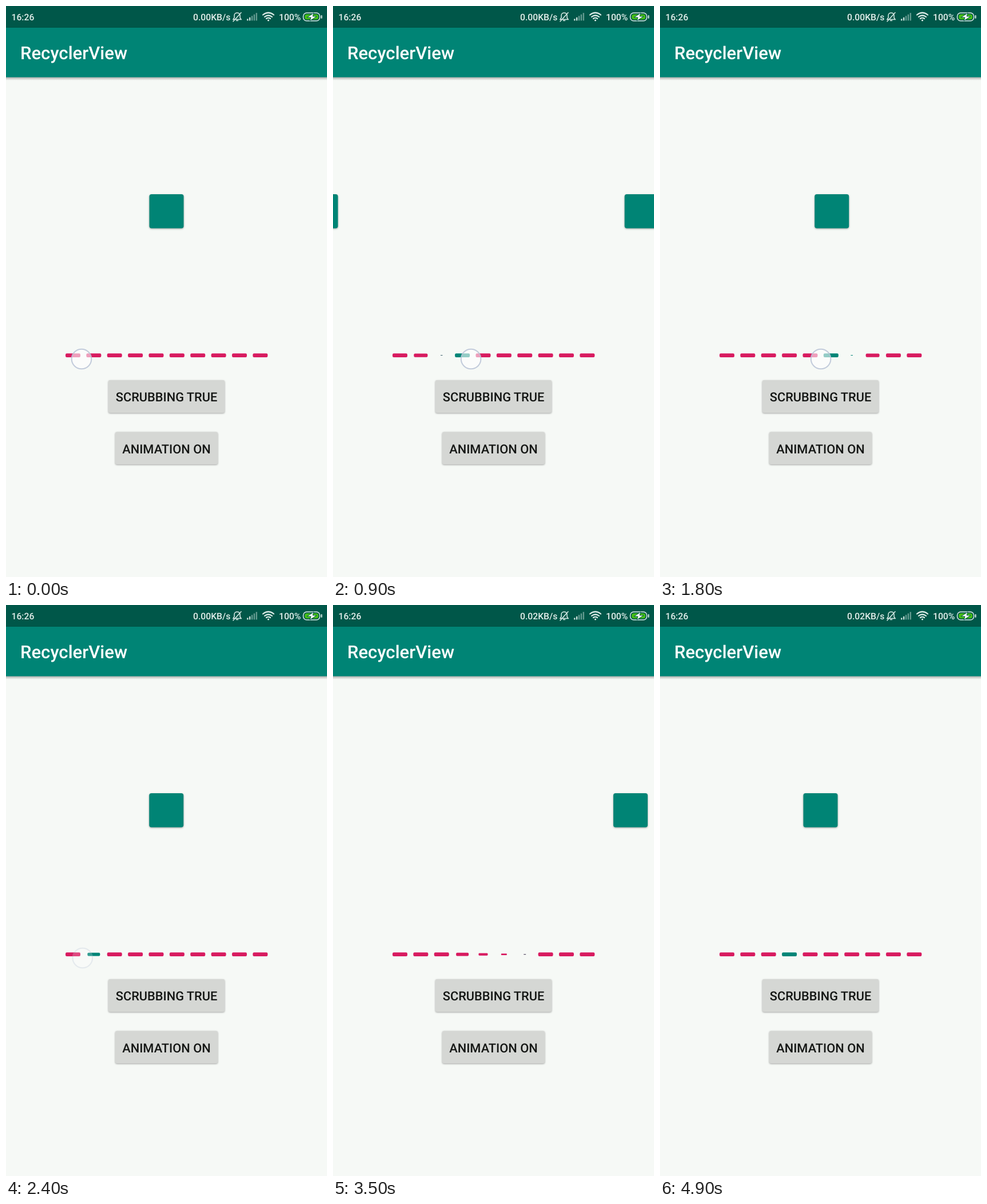
Write an HTML page that moves like this. It is 561x998 px and loops after 5000 ms.

```html
<!DOCTYPE html>
<html lang="en">
<head>
<meta charset="utf-8">
<title>RecyclerView</title>
<style>
  html, body { margin: 0; width: 100%; height: 100%; overflow: hidden; background: #f6f9f6; }
  svg { display: block; width: 561px; height: 998px; font-family: Roboto, sans-serif; font-weight: 500; text-rendering: geometricPrecision; }
  .raised { filter: drop-shadow(0 1.5px 1.5px rgba(0, 0, 0, .35)); }
  .status { fill: #e3eeeb; font-size: 15.7px; }
  .label { fill: #141614; font-size: 21.8px; text-anchor: middle; }
</style>
</head>
<body>
<svg viewBox="0 0 561 998">
  <defs>
    <linearGradient id="shade" x2="0" y2="1">
      <stop stop-color="#000" stop-opacity=".32"/>
      <stop offset="1" stop-color="#000" stop-opacity="0"/>
    </linearGradient>
  </defs>
  <rect width="561" height="998" fill="#f6f9f6"/>

  <rect y="124" width="561" height="6" fill="url(#shade)"/>
  <rect width="561" height="124.5" fill="#008475"/>
  <rect width="561" height="38" fill="#005749"/>
  <text x="25" y="93" font-size="31.1" fill="#fff">RecyclerView</text>

  <g class="status">
    <text x="9.5" y="24.7">16:26</text>
    <text id="speed" x="327" y="24.5">0.00KB/s</text>
    <text x="477" y="24.5">100%</text>
  </g>
  <g fill="none" stroke="#dcebe7" stroke-width="1.5" stroke-linecap="round">
    <path d="M397 23.5h14l-2-3v-4c0-6-10-6-10 0v4zM402.5 25.5h3M411 11.5L397 27"/>
    <path d="M449 15.5q9.5-7.5 19 0M452 19q6.5-5 13 0M455 22q3.5-2.5 7 0" stroke-width="2.2"/>
    <circle cx="458.5" cy="25" r=".8"/>
    <rect x="519.5" y="12" width="29" height="14" rx="6"/>
    <path d="M551.5 17v4" stroke-width="2"/>
  </g>
  <g id="signal" fill="#dcebe7"></g>
  <rect x="522" y="14.5" width="24" height="9" rx="4" fill="#45bd16"/>
  <path d="M538 12l-12 8h7l-2 6 12-8h-7z" fill="#fff" stroke="#005749"/>

  <g id="pages" class="raised" fill="#008475"></g>
  <g id="dashes"></g>

  <g class="raised" fill="#d5d7d4">
    <rect x="179" y="654" width="203" height="57" rx="3"/>
    <rect x="191" y="744.5" width="179" height="56.5" rx="3"/>
  </g>
  <text class="label" x="280.5" y="690.5">SCRUBBING TRUE</text>
  <text class="label" x="280.5" y="781.5">ANIMATION ON</text>

  <circle id="finger" r="17.3" fill="#fff" fill-opacity=".58" stroke="#b9c4d6" stroke-opacity=".85" stroke-width="2"/>
</svg>
<script>
const LOOP = 5000, STEP = 100, COUNT = 10, PAGE = 561, PITCH = 36.37;
const SLACK = 0.95;       // how far the cursor must travel to select another dash
const SCROLL_DELAY = 50;  // ms before the page follows the selection
const STIFFNESS = 0.035;  // critically damped page spring, per ms
const TEAL = [0, 133, 119], PINK = [216, 27, 96];
const $ = id => document.getElementById(id);
const clamp = v => Math.max(0, Math.min(1, v));

function setAttrs(node, attrs) {
  for (const name in attrs) node.setAttribute(name, attrs[name]);
  return node;
}
function addRect(parent, attrs) {
  const rect = document.createElementNS('http://www.w3.org/2000/svg', 'rect');
  return parent.appendChild(setAttrs(rect, attrs));
}

// Keys are [time, value], joined by straight lines.
function track(keys, t) {
  const next = keys.findIndex(key => key[0] > t);
  if (next === 0) return keys[0][1];
  if (next < 0) return keys[keys.length - 1][1];
  const [t0, a] = keys[next - 1], [t1, b] = keys[next];
  return a + (b - a) * (t - t0) / (t1 - t0);
}

// Scrub right and back, fling to 7, tap on 3; values are dash positions.
const cursorKeys = [[500, 0], [600, 2], [800, 2.95], [900, 3], [1300, 9], [1500, 6.05], [1743, 5.05],
  [1800, 4.1], [2050, 1.05], [2390, .05], [3000, .05], [3388, 7], [4100, 7], [4100, 2.55]];
const touchKeys = [[2300, 1], [2400, .35], [2500, 0], [4000, 0], [4200, 1], [4400, 1], [4600, 0]];
const shrinkGrow = [[0, 1], [55, .14], [110, .14], [320, 1]];

// Runs the pager once through the loop and keeps its state at every step.
function simulate() {
  const frames = [], released = Array(COUNT).fill(-Infinity);
  let index = 0, since = 0, target = 0, page = 0, speed = 0;
  for (let t = 0; t < LOOP; t++) {
    const cursor = track(cursorKeys, t), touch = track(touchKeys, t);
    let next = index;
    if (cursor >= index + SLACK) next = Math.floor(cursor + 1 - SLACK);
    if (cursor <= index - SLACK) next = Math.ceil(cursor - 1 + SLACK);
    if (next !== index) {
      released[index] = since = t;
      index = next;
    }
    if (t - since >= SCROLL_DELAY) target = index;
    speed += STIFFNESS * (STIFFNESS * (target - page) - 2 * speed);
    page += speed;
    if (t % STEP) continue;

    // The new dash lights once the old one has shrunk; an untouched pager must settle first.
    const lit = t - since >= SCROLL_DELAY && (touch > 0 || Math.abs(index - page) < .01);
    const dashes = released.map((time, i) => i === index
      ? { scale: 1, mix: lit ? 0 : 1 }
      : { scale: track(shrinkGrow, t - time), mix: clamp((t - time - 70) / 100) });
    frames.push({ cursor, touch, page, dashes });
  }
  return frames;
}

for (let i = 0; i < 5; i++) {
  const height = 3 + 2.6 * i;
  addRect($('signal'), { x: 421 + 3.9 * i, y: 25.5 - height, width: 2.4, height, opacity: i < 2 ? .9 : .45 });
}
for (let i = 0; i < COUNT; i++) {
  addRect($('pages'), { x: 250.5 + PAGE * i, y: 329, width: 60, height: 59.5, rx: 4 });
}
const bars = Array.from({ length: COUNT }, () => addRect($('dashes'), {}));
const frames = simulate();

function draw(t) {
  const { cursor, touch, page, dashes } = frames[Math.floor(t / STEP)];
  dashes.forEach(({ scale, mix }, i) => {
    const width = 26 * scale, height = 6.8 * scale;
    const color = TEAL.map((c, k) => Math.round(c + (PINK[k] - c) * mix));
    setAttrs(bars[i], {
      x: 117 + PITCH * i - width / 2, y: 610.6 - height / 2,
      width, height, rx: 2.2 * scale, fill: `rgb(${color})`
    });
  });
  setAttrs($('pages'), { transform: `translate(${-PAGE * page} 0)` });
  setAttrs($('finger'), { cx: 132 + PITCH * cursor, cy: t < 3000 ? 617 : 613.5, opacity: touch });
  $('speed').textContent = t < 2900 ? '0.00KB/s' : '0.02KB/s';
}

const start = performance.now();
function tick() {
  draw((performance.now() - start) % LOOP);
  requestAnimationFrame(tick);
}
tick();
</script>
</body>
</html>
```
